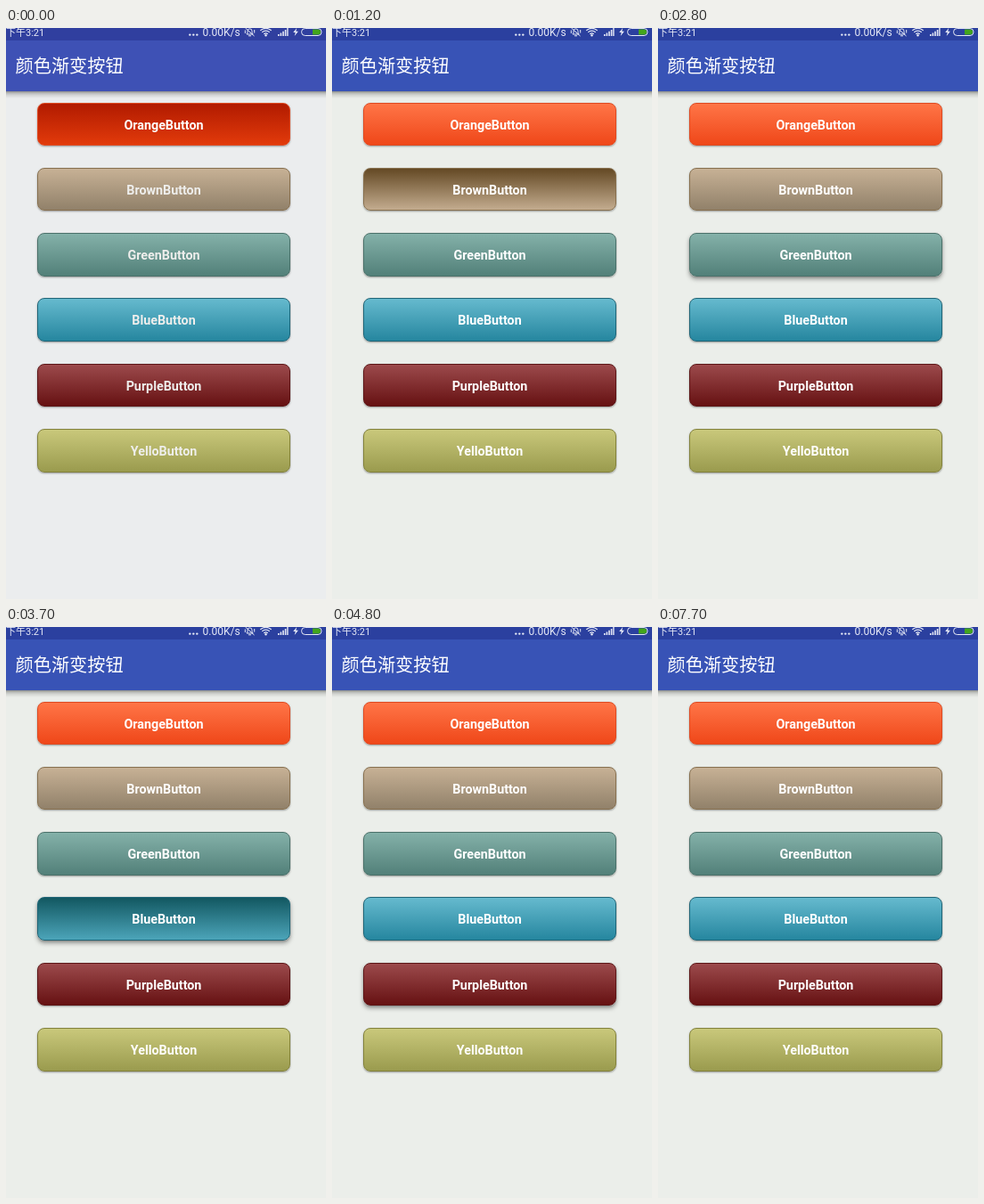
Animation, 359 px wide and 641 px high, one loop 8.3 s. Source, as an HTML page:

```html
<!DOCTYPE html>
<html lang="zh">
<head>
<meta charset="utf-8">
<title>颜色渐变按钮</title>
<style>
  html, body { margin: 0; width: 100%; height: 100%; overflow: hidden; }
  #stage {
    position: relative; width: 359px; height: 641px; overflow: hidden;
    background: #ebeeea; --bar: #3853b6; --status: #2b409f; --label: #fff;
  }
  #stage.intro { background: #ebedee; --bar: #3e51b5; --status: #303f9f; --label: #eeeeec; }
  #bar { position: absolute; inset: 0 0 auto; height: 71px; background: var(--bar); }
  #bar::before { content: ""; position: absolute; inset: 0 0 auto; height: 14px; background: var(--status); }
  #bar::after {
    content: ""; position: absolute; top: 71px; width: 100%; height: 8px;
    background: linear-gradient(rgba(0,0,0,.42), rgba(0,0,0,.22) 25%, rgba(0,0,0,.1) 55%, transparent);
  }
  svg { position: absolute; left: 0; top: 0; }
  text { fill: #fff; font-family: Roboto, "Noto Sans CJK SC", "Noto Sans CJK", sans-serif; }
  .status { fill: #e6e9f6; }
  .button {
    position: absolute; left: 35px; width: 284px; height: 48.5px; box-sizing: border-box;
    border: 1px solid; border-radius: 8px; background-origin: border-box;
    text-align: center; font: bold 14.3px/48px Roboto, sans-serif;
    box-shadow: 0 1px 2px rgba(0,0,0,.36);
  }
  .button.lifted { box-shadow: 0 3px 5px rgba(0,0,0,.36), 0 1px 2px rgba(0,0,0,.16); }
  .button span { color: var(--label); }
  .button.pressed span { color: #fff; }
</style>
</head>
<body>
<div id="stage">
  <div id="bar"></div>
  <svg width="359" height="72" viewBox="0 0 359 72" fill="none" stroke="#e6e9f6">
    <g stroke="none">
      <text class="status" x="0" y="8.6" font-size="11">下午3:21</text>
      <text class="status" id="speed" x="220.5" y="8.8" font-size="12">0.00K/s</text>
      <text x="10.5" y="49.7" font-size="20.2">颜色渐变按钮</text>
      <g fill="#e6e9f6">
        <circle cx="206.3" cy="7.6" r="1.2"/><circle cx="210.3" cy="7.6" r="1.2"/><circle cx="214.3" cy="7.6" r="1.2"/>
        <path d="M305 9v-2h1.6v2zM307.6 9V5.4h1.6V9zM310.2 9V3.8h1.6V9zM312.8 9V2h1.6v7zM315.2 9V0h1.4v9z"/>
        <path d="M326.2 0l-4 5h2.5l-1 4 4.2-5.3h-2.6z"/>
        <circle cx="291.5" cy="8.2" r="1.2"/>
      </g>
    </g>
    <path d="M270 7h7l-1-1.8V3.4a2.5 2.5 0 0 0-5 0v1.8zM272 8.8h3M268.5 0l10 9M268.3 2.5v3.5M278.7 2v3.5"/>
    <path d="M285.3 2.8q6.2-5 12.4 0M287.3 4.8q4.2-3.2 8.4 0M289.3 6.7q2.2-1.7 4.4 0" stroke-width="1.2"/>
    <rect x="331.5" y=".5" width="22.5" height="8" rx="4"/>
    <path d="M344 1.5h6a3 3 0 0 1 0 6h-6z" fill="#43a51c" stroke="none"/>
  </svg>
</div>
<script>
const LOOP = 8300;

// label, normal top/bottom, pressed top/bottom, border, then times: press, lift, release, settle
const BUTTONS = [
  ["Orange", "#ff7648", "#ef4618", "#b01a00", "#e33b0b", "#de4a22", 0, 800, 900, 1000],
  ["Brown", "#c8b296", "#908069", "#624722", "#c5ae91", "#87704f", 1200, 1600, 1700, 1900],
  ["Green", "#85b2aa", "#517f78", "#24534c", "#80b0a7", "#4b716a", 2100, 2200, 2800, 3100],
  ["Blue", "#67bbcf", "#24859e", "#11565f", "#4da6bb", "#1f6577", 3400, 3700, 3800, 4200],
  ["Purple", "#9d4b4d", "#651011", "#470707", "#9a4648", "#5d1718", 4500, 4600, 4800, 5200],
  ["Yello", "#cac97c", "#999a4d", "#68681f", "#c5c678", "#82813b", 5400, 5500, 5700, 6100]
];

const stage = document.getElementById("stage");
const speed = document.getElementById("speed");
const within = (t, from, to) => t >= from && t < to;
const fade = (top, bottom) => `linear-gradient(${top}, ${bottom})`;

const views = BUTTONS.map(([name, top, bottom, downTop, downBottom, border, ...times], i) => {
  const el = document.createElement("div");
  const label = document.createElement("span");
  label.textContent = name + "Button";
  el.className = "button";
  el.style.top = 83.5 + 73.3 * i + "px";
  el.style.borderColor = border;
  el.append(label);
  stage.append(el);
  return { el, times, normal: fade(top, bottom), down: fade(downTop, downBottom) };
});

function draw() {
  const t = performance.now() % LOOP;
  stage.classList.toggle("intro", t < 800);
  speed.textContent = within(t, 5600, 7700) ? "0.66K/s" : "0.00K/s";
  for (const { el, times: [press, lift, release, settle], normal, down } of views) {
    const pressed = within(t, press, release);
    el.classList.toggle("pressed", pressed);
    el.classList.toggle("lifted", within(t, lift, settle));
    el.style.backgroundImage = pressed ? down : normal;
  }
  requestAnimationFrame(draw);
}
draw();
</script>
</body>
</html>
```
